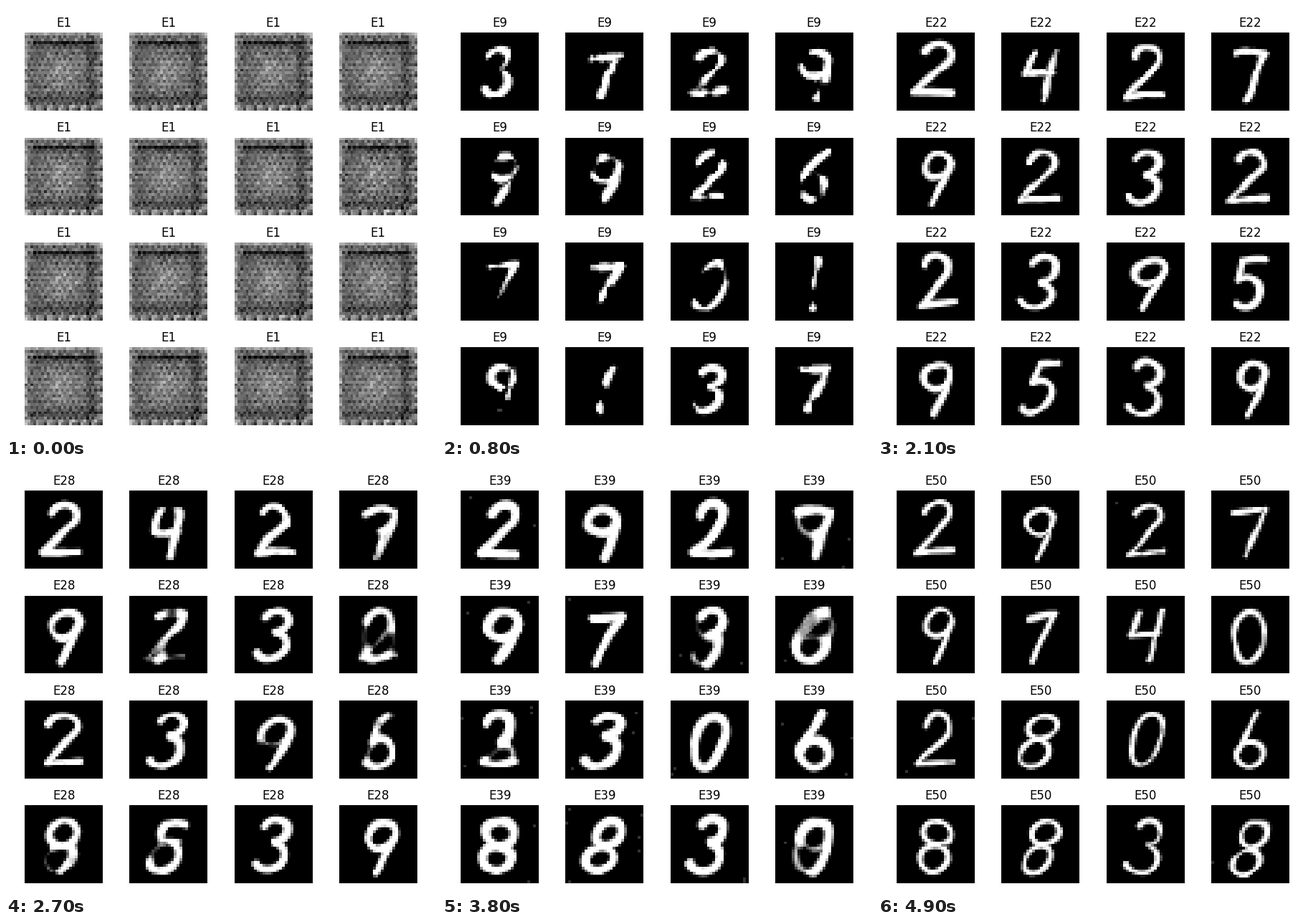
Recreate the animation shown at these times as a matplotlib script. Size 600 by 600 pixels, loop 5000 ms.

```python
import numpy as np
import matplotlib.pyplot as plt
from matplotlib.animation import FuncAnimation

N, SIDE, EPOCHS, CELLS = 28, 110, 50, 16
row, col = np.mgrid[:N, :N]
Y, X = (row + 0.5) * SIDE / N, (col + 0.5) * SIDE / N


def line(*xy):
    """Dense points along a polyline."""
    corners = np.reshape(xy, (-1, 2))
    s = np.linspace(0, len(corners) - 1, 16 * (len(corners) - 1) + 1)
    knots = np.arange(len(corners))
    return np.column_stack([np.interp(s, knots, corners[:, k]) for k in (0, 1)])


def arc(cx, cy, rx, ry, start=0, end=360):
    """Dense points along an ellipse, degrees clockwise from the right."""
    a = np.radians(np.linspace(start, end, 50))
    return np.column_stack([cx + rx * np.cos(a), cy + ry * np.sin(a)])


DIGITS = {
    "0": [arc(54, 58, 22, 35)],
    "1": [line(58, 20, 54, 94)],
    "2": [arc(54, 37, 18, 17, 195, 380), line(71, 43, 34, 88, 82, 86)],
    "3": [arc(54, 38, 17, 16, 205, 440), arc(54, 74, 20, 19, -80, 150)],
    "4": [line(42, 28, 36, 57, 72, 57), line(72, 26, 66, 94)],
    "5": [line(74, 24, 46, 27, 42, 52), arc(52, 71, 20, 21, -120, 140)],
    "6": [line(64, 18, 46, 48, 37, 72), arc(56, 74, 20, 19)],
    "7": [line(34, 31, 76, 29, 62, 60, 52, 94)],
    "8": [arc(56, 38, 19, 17), arc(54, 76, 19, 18)],
    "9": [arc(55, 42, 19, 18), line(74, 38, 69, 66, 60, 94)],
}

# The digit each sample resembles at milestones of the training.
STAGES = {
    9: "3729992677019137",
    15: "0127673079039539",
    22: "2427923223959539",
    35: "2929973023068839",
    43: "2927979633068830",
    50: "2927974028068838",
}
MILESTONES = [1, *STAGES]


def waves(seed, epoch, scale):
    """Smooth seeded field of unit variance that drifts with the epoch."""
    rng = np.random.default_rng(seed)
    field = 0
    for _ in range(6):
        kx, ky = rng.normal(0, 1 / scale, 2)
        phase = rng.uniform(0, 2 * np.pi) + rng.normal(0, 0.5) * epoch
        field = field + np.sin(kx * X + ky * Y + phase)
    return field / np.sqrt(3)


def digit_distance(digit, cell, epoch):
    """Distance to the slanted digit, in coordinates bent by drifting waves."""
    slant = np.random.default_rng(cell).uniform(0.02, 0.28)
    size = np.interp(epoch, [9, 22], [0.88, 1])
    points = np.vstack(DIGITS[digit])
    px = 55 + size * (points[:, 0] - 55 + slant * (56 - points[:, 1]))
    py = 57 + size * (points[:, 1] - 57)
    x = X + 2 * waves(100 + cell, epoch, 25)
    y = Y + 2 * waves(200 + cell, epoch, 25)
    return np.hypot(x[..., None] - px, y[..., None] - py).min(axis=-1)


def shape_distance(stage, cell, epoch):
    if stage == 1:
        distance = np.hypot(X - 55, Y - 55) - 22
    else:
        distance = digit_distance(STAGES[stage][cell], cell, epoch)
    return np.clip(distance, 0, 11)


def digit_image(epoch, cell):
    later = next(m for m in MILESTONES[1:] if epoch <= m)
    earlier = MILESTONES[MILESTONES.index(later) - 1]
    t = (epoch - earlier) / (later - earlier)
    distance = t * shape_distance(later, cell, epoch)
    if t < 1:
        distance += (1 - t) * shape_distance(earlier, cell, epoch)

    weight = np.interp(epoch, [9, 22, 35, 43, 50], [4, 4.8, 5, 7, 3.8])
    weight += 2 * t * (1 - t)
    # Early strokes are broken into fragments; later ones vary a little.
    breakage = np.interp(epoch, [9, 15, 22], [3.5, 2, 0.7])
    level = weight - distance - breakage * np.maximum(waves(300 + cell, epoch, 9), -0.5)
    ink = np.clip(level / 3.5 + 0.5, 0, 1)

    # Faint artefacts scattered near the borders at the overshoot.
    rng = np.random.default_rng(1000 * cell + epoch)
    chance = 0.03 * np.exp(-((epoch - 43) / 4) ** 2)
    border = np.abs(X - 55) > 38
    specks = (rng.random((N, N)) < chance) & border
    return np.maximum(ink, 0.2 * specks)


def lattice(cell):
    """Grey output of the untrained generator: a shared pattern plus noise."""
    shared = np.random.default_rng(7).normal(0, 0.05, (N, N))
    noise = np.random.default_rng(cell).normal(0, 0.035, (N, N))
    grey = 0.4 + 0.2 * np.exp(-((row - 14) ** 2 + (col - 13) ** 2) / 60)
    grey -= 0.16 * ((row % 2 == 1) & ((col + row // 2) % 2 == 0))
    grey += 0.06 * np.cos(np.pi * row / 2) * np.cos(np.pi * col / 2)
    inside = (col > 2) & (col < 25)
    grey -= inside * np.where(row == 3, 0.25, 0.12 * (row == 4))
    grey -= 0.08 * ((col > 21) & (col < 25)) + 0.1 * ((row > 21) & (row < 25))
    grey += 0.22 * np.exp(-np.minimum(row, col) / 0.8)
    grey += 0.25 * ((row > 25) & (col % 4 < 2)) + 0.2 * ((col > 25) & (row % 4 < 2))
    return np.clip(grey + shared + noise, 0, 1)


def sample(epoch, cell):
    untrained = max(0, 1 - (epoch - 1) / 6) ** 2
    return untrained * lattice(cell) + (1 - untrained) * digit_image(epoch, cell)


fig, axes = plt.subplots(4, 4, figsize=(6, 6), dpi=100)
images, titles = [], []
for cell, ax in enumerate(axes.flat):
    images.append(ax.imshow(sample(1, cell), cmap="gray", vmin=0, vmax=1))
    titles.append(ax.set_title("E1", fontsize=12, fontfamily="DejaVu Sans"))
    ax.axis("off")
fig.tight_layout()


def update(frame):
    for cell, (image, title) in enumerate(zip(images, titles)):
        image.set_data(sample(frame + 1, cell))
        title.set_text(f"E{frame + 1}")
    return images + titles


anim = FuncAnimation(fig, update, frames=EPOCHS, interval=100, repeat=True)
plt.show()
```
